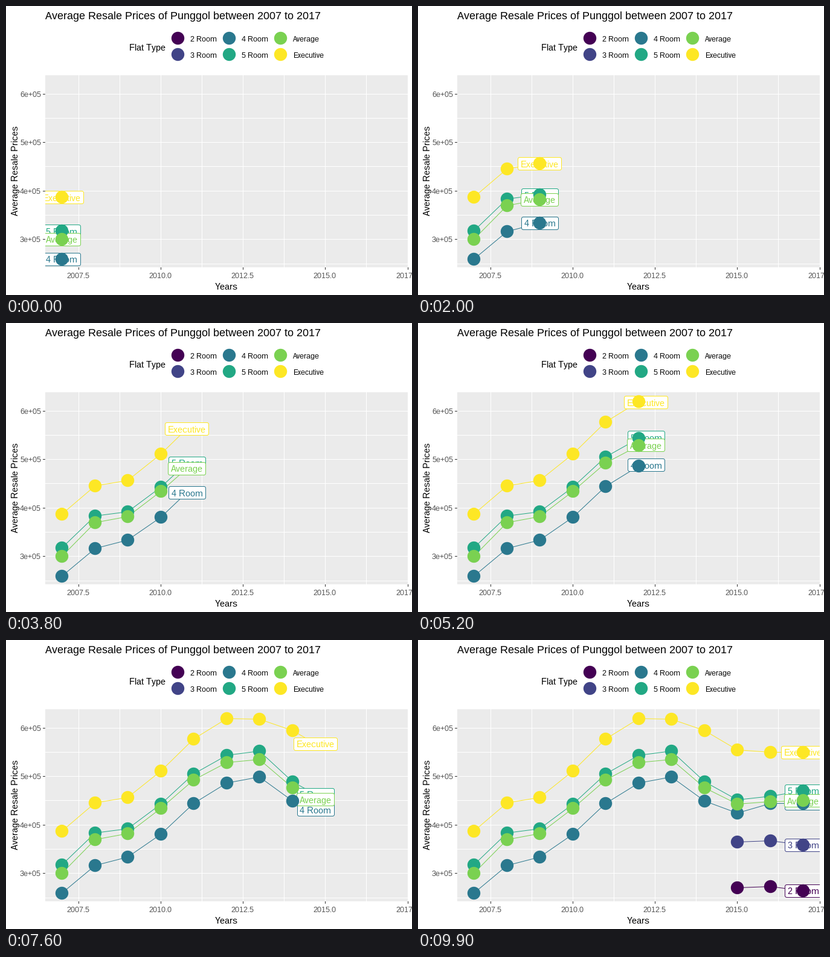
A matplotlib script for the animation above (10000 ms loop, 672 px wide and 480 px high).

```python
import numpy as np
import matplotlib.pyplot as plt
from matplotlib.animation import FuncAnimation
from matplotlib.patches import Circle, FancyBboxPatch, Rectangle

plt.rcParams.update({
    "font.family": "Liberation Sans",
    "text.hinting": "default",
    "text.hinting_factor": 1,
    "text.kerning_factor": 6,
    "path.snap": False,
})

W, H, DPI = 672, 480, 96
PX = 72 / DPI  # points per pixel
FRAMES = 100
LEFT, RIGHT, TOP, BOTTOM = 65, 665, 115, 434
FIRST, LAST = 2007, 2017

# Market level: a 5 room flat in thousands, one value a year
MARKET = [318, 384, 392, 443, 505, 544, 552, 489, 452, 459, 470]

# Gap to the market level at turning points; each track starts at its first
SMALL = {2015: -87, 2016: -92, 2017: -111}
GAPS = {
    "2 Room": {year: gap - 94.5 for year, gap in SMALL.items()},
    "3 Room": SMALL,
    "4 Room": {2007: -58, 2008: -67, 2009: -58, 2010.5: -63, 2013: -53,
               2016: -14, 2017: -25},
    "5 Room": {2007: 0},
    "Average": {2007: -18, 2009.5: -7.5, 2013: -17.5, 2015.5: -6, 2017: -19},
    "Executive": {2007: 69, 2008: 62, 2012: 75, 2013: 66, 2014: 106,
                  2015: 103, 2017: 80},
}
COLORS = plt.get_cmap("viridis")(np.linspace(0, 1, len(GAPS)))


def px(year):
    return np.floor(65 + (np.asarray(year) - 2006.5) * 54.5 + 0.5) + 0.5


def py(price):
    return np.floor(387.3 - (np.asarray(price) - 300) * 0.8055 + 0.5) + 0.5


def frame_of(year):
    return np.floor((FRAMES - 1) * (year - FIRST) / (LAST - FIRST) + 0.5)


fig = plt.figure(figsize=(W / DPI, H / DPI), dpi=DPI, facecolor="white")
ax = fig.add_axes([0, 0, 1, 1])
ax.set(xlim=(0, W), ylim=(H, 0))
ax.axis("off")

panel = Rectangle((LEFT, TOP), RIGHT - LEFT, BOTTOM - TOP, fc="#EBEBEB",
                  lw=0, zorder=0)
ax.add_patch(panel)


def text(x, y, s, size, color="black", **kw):
    return ax.text(x, y, s, fontsize=size * PX, color=color,
                   va="baseline", **kw)


def rule(xs, ys, color="white", zorder=1):
    return ax.plot(xs, ys, color=color, lw=PX, solid_capstyle="butt",
                   zorder=zorder)[0]


def dot(x, y, color, zorder):
    return ax.add_patch(Circle((x, y), 10.7, fc=color, lw=0, zorder=zorder))


def draw_axes():
    for year in np.arange(2007.5, 2018, 2.5):
        x = px(year)
        rule([x, x], [TOP, BOTTOM])
        rule([x, x], [BOTTOM, BOTTOM + 4], "#333333")
        text(x - 1, 452, f"{year:.1f}", 12, "#4D4D4D", ha="center")
    for year in np.arange(2008.75, 2017, 2.5):
        rule([px(year)] * 2, [TOP, BOTTOM])
    for price in range(300, 700, 100):
        y = py(price)
        rule([LEFT, RIGHT], [y, y])
        rule([LEFT - 4, LEFT], [y, y], "#333333")
        text(58, y + 4.5, f"{price // 100}e+05", 12, "#4D4D4D", ha="right")
    for price in range(250, 600, 100):
        rule([LEFT, RIGHT], [py(price)] * 2)
    text(65, 22, "Average Resale Prices of Punggol between 2007 to 2017", 18)
    text(365, 471, "Years", 15, ha="center")
    text(20, 273.5, "Average Resale Prices", 15, ha="center",
         rotation=90, rotation_mode="anchor")


def draw_legend():
    text(204, 74, "Flat Type", 15)
    for i, (name, color) in enumerate(zip(GAPS, COLORS)):
        x, y = 284.5 + 85 * (i // 2), 53.5 + 27 * (i % 2)
        dot(x, y, color, 2)
        text(x + 20.5, y + 5.5, name, 12)


class Track:
    """One flat type: its line, moving label and revealed points."""

    def __init__(self, order, name, gaps, color):
        self.years = np.arange(min(gaps), LAST + 1)
        self.keys = frame_of(self.years)
        self.prices = (np.array(MARKET)[self.years - FIRST]
                       + np.interp(self.years, list(gaps), list(gaps.values())))
        self.line = rule([], [], color, 2)
        self.dots = [dot(x, y, color, 20 + order)
                     for x, y in zip(px(self.years), py(self.prices))]
        self.text = text(0, 0, name, 15, color, ha="center",
                         zorder=5 + order + 0.5)
        self.w = round(self.text.get_window_extent().width + 9)
        self.h = 21
        self.box = FancyBboxPatch(
            (0, 0), self.w, self.h, fc="white", ec=color, lw=PX,
            boxstyle="round,pad=0,rounding_size=2.9", zorder=5 + order)
        ax.add_patch(self.box)
        for artist in (self.line, self.text, self.box, *self.dots):
            artist.set_clip_on(True)
            artist.set_clip_path(panel)

    def update(self, frame):
        seen = self.keys <= frame
        for point, on in zip(self.dots, seen):
            point.set_visible(on)
        for artist in (self.line, self.text, self.box):
            artist.set_visible(seen.any())
        x = px(np.interp(frame, self.keys, self.years))
        y = py(np.interp(frame, self.keys, self.prices))
        self.line.set_data(np.append(px(self.years[seen]), x),
                           np.append(py(self.prices[seen]), y))
        self.text.set_position((x, y + 6))
        self.box.set_x(np.floor(x - self.w / 2) + 0.5)
        self.box.set_y(np.floor(y - self.h / 2) + 0.5)


draw_axes()
draw_legend()
tracks = [Track(i, name, gaps, color)
          for i, ((name, gaps), color) in enumerate(zip(GAPS.items(), COLORS))]


def update(frame):
    for track in tracks:
        track.update(frame)
    return []


anim = FuncAnimation(fig, update, frames=FRAMES, interval=1000 * 10 / FRAMES,
                     init_func=lambda: update(0), repeat=True,
                     repeat_delay=0, blit=False)
plt.show()
```
